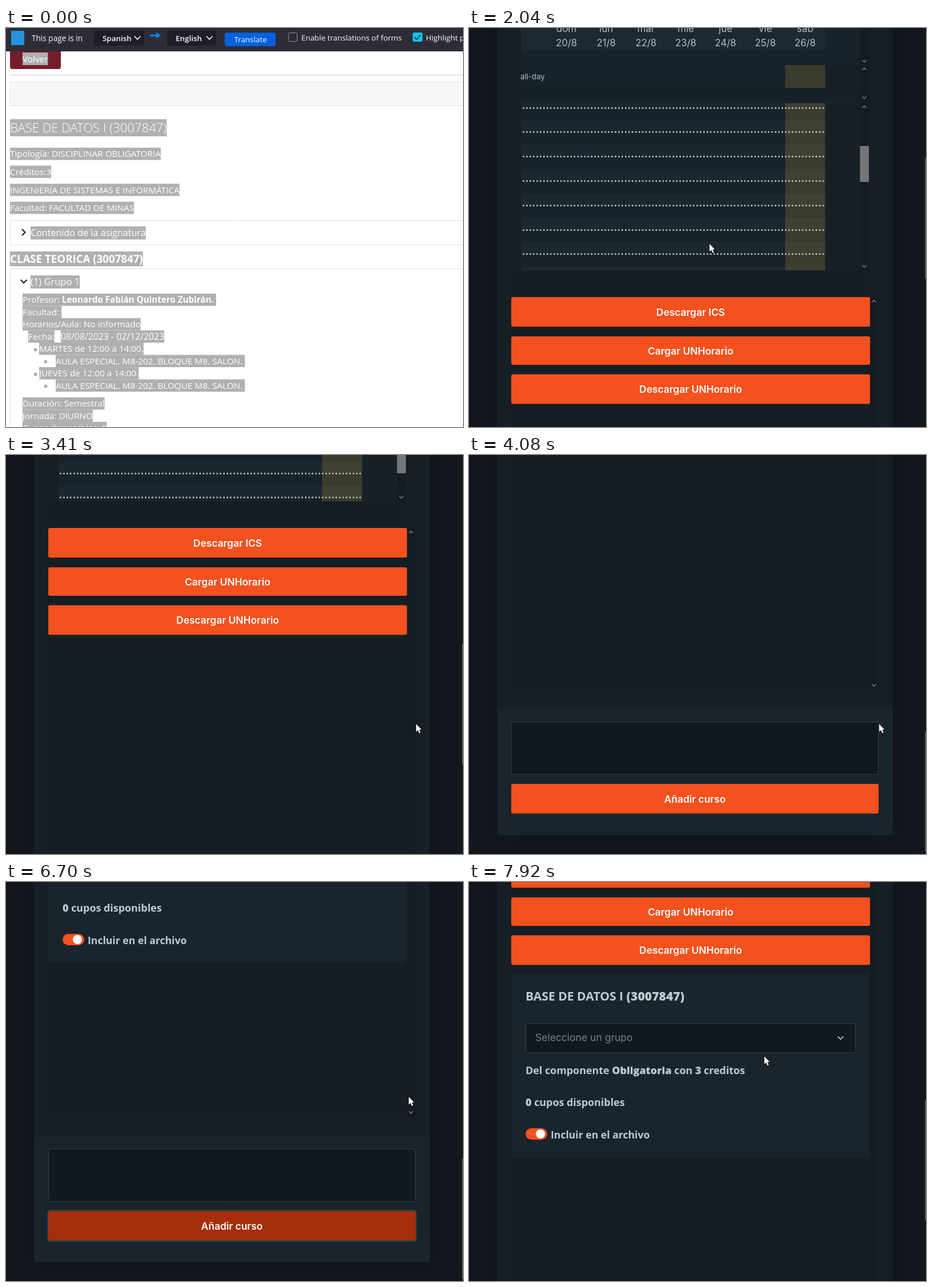
These frames come from a looping animation (800 by 700 pixels, 7.99 s). An HTML page with a canvas:

```html
<!DOCTYPE html>
<html lang="es">
<head>
<meta charset="utf-8">
<style>
  html, body { margin: 0; width: 100%; height: 100%; overflow: hidden; background: #11181f; }
  canvas { display: block; }
</style>
</head>
<body>
<canvas id="stage" width="800" height="700"></canvas>
<script>
const LOOP = 7990;
const c = document.getElementById('stage').getContext('2d');
const SANS = '"Open Sans", "Noto Sans", sans-serif';
const UI = 'Inter, sans-serif';
const ORANGE = [244, 81, 30], HOVER = [189, 57, 16], PRESSED = [165, 46, 13];

// Eased value from [time, value] keys.
function at(t, keys) {
  if (t <= keys[0][0]) return keys[0][1];
  for (let i = 1; i < keys.length; i++) {
    const [t0, a] = keys[i - 1], [t1, b] = keys[i];
    if (t < t1) {
      const p = (t - t0) / (t1 - t0);
      return a + (b - a) * p * p * (3 - 2 * p);
    }
  }
  return keys[keys.length - 1][1];
}
const mix = (a, b, p) => `rgb(${a.map((v, i) => Math.round(v + (b[i] - v) * p))})`;

function rect(x, y, w, h, fill, radius = 0, stroke) {
  c.beginPath();
  c.roundRect(x, y, w, h, radius);
  if (fill) { c.fillStyle = fill; c.fill(); }
  if (stroke) { c.strokeStyle = stroke; c.lineWidth = 1; c.stroke(); }
}
function text(s, x, y, size, color, { weight = 400, family = SANS, align = 'left' } = {}) {
  c.font = `${weight} ${size}px ${family}`;
  c.textAlign = align;
  c.fillStyle = color;
  c.fillText(s, x, y);
  return c.measureText(s).width;
}
function selected(s, x, top, h, size = 15.3, weight = 400) {
  c.font = `${weight} ${size}px ${SANS}`;
  const w = c.measureText(s).width;
  rect(x, top, w, h, '#b0b0b0');
  text(s, x, top + h * 0.76, size, '#fff', { weight });
  return x + w;
}
function line(points, color, width) {
  c.beginPath();
  points.forEach(([x, y]) => c.lineTo(x, y));
  c.strokeStyle = color;
  c.lineWidth = width;
  c.stroke();
}
// dir 1 points down, -1 points up
const chevron = (x, y, dir, size = 3.5, color = '#747a80', width = 1.6) =>
  line([[x - size, y - dir * size / 2], [x, y + dir * size / 2], [x + size, y - dir * size / 2]], color, width);

function drawToolbar() {
  rect(0, 0, 800, 41, '#2e2d37');
  rect(9, 5, 23, 25, '#2493e0');
  text('This page is in', 45, 23, 13.6, '#fbfbfe');
  [['Spanish', 154, 88], ['English', 282, 86]].forEach(([s, x, w]) => {
    rect(x, 4, w, 27, '#1f1e27', 4);
    text(s, x + 15, 23, 13.4, '#fbfbfe', { weight: 600 });
    chevron(x + w - 12, 17, 1, 5.5, '#fbfbfe', 1.6);
  });
  line([[252, 13], [266, 13]], '#0a84e8', 3);
  c.beginPath();
  c.moveTo(263, 7.5); c.lineTo(271, 13); c.lineTo(263, 18.5);
  c.fillStyle = '#0a84e8';
  c.fill();
  rect(383, 8, 89, 24, '#0061e0', 4);
  text('Translate', 428, 25, 13.4, '#fbfbfe', { align: 'center' });
  rect(494.5, 8.5, 15, 15, '#2b2a33', 2, '#8f8f9d');
  text('Enable translations of forms', 517, 22, 13.4, '#fbfbfe');
  rect(712, 8, 17, 16, '#00c8f2', 2);
  line([[715, 16], [719, 20], [726, 12]], '#2b2a33', 1.8);
  text('Highlight phrases', 735, 22, 13.4, '#fbfbfe');
}

function drawCatalog() {
  rect(0, 0, 800, 700, '#fff');
  rect(7, 30, 89, 42, '#761d2c', 4);
  selected('Volver', 29, 43, 22);
  rect(7, 82, 793, 1, '#c9cad0');
  rect(7.5, 94.5, 800, 42, '#f7f8fa', 0, '#dfe3e8');
  rect(0, 94, 7, 44, '#fff');
  selected('BASE DE DATOS I (3007847)', 7, 160, 30, 22.1, 300);
  ['Tipología: DISCIPLINAR OBLIGATORIA', 'Créditos:3',
   'INGENIERÍA DE SISTEMAS E INFORMÁTICA', 'Facultad: FACULTAD DE MINAS']
    .forEach((s, i) => selected(s, 7, 210 + i * 31.6, 21.5));
  rect(7.5, 337.5, 800, 43, '#fff', 0, '#dfe1e5');
  line([[28, 353], [33.5, 358.5], [28, 364]], '#222', 2.2);
  selected('Contenido de la asignatura', 43, 348, 23, 16.1);
  selected('CLASE TEORICA (3007847)', 7, 392, 26, 18.7, 700);
  rect(7.5, 422.5, 800, 400, '#fff', 0, '#dfe1e5');
  chevron(31, 444.5, 1, 5.5, '#222', 2.2);
  selected('(1) Grupo 1', 43, 434, 23, 16.5);
  const end = selected('Profesor: ', 29, 466, 21.5);
  selected('Leonardo Fabián Quintero Zubirán. ', end, 466, 21.5, 15.2, 700);
  selected('Facultad: ', 29, 487.5, 21.5);
  selected('Horarios/Aula: No informado', 29, 509, 21.5);
  selected('Fecha:', 39, 530.5, 21.5);
  selected('08/08/2023 - 02/12/2023', 96, 530.5, 21.5, 15.8);
  ['MARTES', 'JUEVES'].forEach((day, i) => {
    const y = 552 + i * 43;
    rect(49, y + 10, 5, 5, '#a8a8a8');
    selected(day + ' de 12:00 a 14:00.', 58, y, 21.5);
    rect(67, y + 31, 5, 5, '#a8a8a8');
    selected('AULA ESPECIAL. M8-202. BLOQUE M8. SALON. ', 87, y + 21.5, 21.5);
  });
  ['Duración: Semestral', 'Jornada: DIURNO', 'Cupos disponibles: 0']
    .forEach((s, i) => selected(s, 29, 648 + i * 21.5, 21.5));
  drawToolbar();
}

function drawCalendar(t) {
  const ROW = 42.8, END = 491.6;
  const scroll = at(t, [[2060, 0], [2240, END / 2], [2300, END / 2], [2480, END]]);
  rect(91, 0, 609, 425, '#18222a');
  rect(91, 0, 532.5, 40, '#1e2830');
  rect(91, 105, 609, 27, '#162027');
  rect(623.5, 65, 61.5, 360, '#172027');
  rect(685, 0, 15, 425, '#141b22');
  rect(91, 129, 609, 2, '#1a242b');
  ['dom', 'lun', 'mar', 'mié', 'jue', 'vie', 'sáb'].forEach((day, i) => {
    const x = 170.5 + i * 69.65, style = { family: UI, align: 'center' };
    text(day, x, 7, 17, '#b3bfc7', style);
    text(20 + i + '/8', x, 31.5, 16.7, '#b3bfc7', style);
  });
  text('all-day', 90, 90, 13.2, '#b3bfc7', { family: UI });
  rect(553.5, 65, 70, 40, '#3b3c2c');

  c.save();
  c.beginPath();
  c.rect(91, 132, 532.5, 293);
  c.clip();
  rect(553.5, 132, 70, 293, '#3b3c2c');
  c.lineCap = 'round';
  for (let rowY = 140 - scroll % ROW; rowY < 460; rowY += ROW) {
    const y = Math.floor(rowY) + 0.5;
    rect(91, y - 21, 533, 21, 'rgba(255,255,255,.025)');
    c.setLineDash([0, 5.96]);
    line([[95.5, y], [621, y]], '#bcc7cd', 3);
    c.setLineDash([]);
  }
  c.restore();

  rect(684.5, 207 + 106 * scroll / END, 15.5, 63, '#74777a');
  [[58, 1], [72, -1], [122, 1], [138.5, -1], [418, 1]].forEach(([y, dir]) => chevron(692, y, dir));
}

function button(label, x, y, w, h, color) {
  rect(x, y, w, h, color, 3);
  text(label, x + w / 2, y + h / 2 + 6.5, 17.4, '#fff', { weight: 600, family: UI, align: 'center' });
}

function runs(x, y, size, parts) {
  parts.forEach(([s, weight]) => { x += text(s, x, y, size, '#bfcad2', { weight }); });
}

function drawCourse() {
  rect(74, 676, 628, 321, '#1a242c', 3);
  runs(99, 722, 21.1, [['BASE DE DATOS I ', 700], ['(3007847)', 800]]);
  rect(99.5, 762.5, 577, 51, '#11181e', 3, '#33434f');
  text('Seleccione un grupo', 116, 793, 17.5, '#73828c', { family: UI });
  chevron(650.5, 787.5, 1, 5, '#a5b1b9', 1.8);
  runs(99, 851, 17.9, [['Del componente ', 700], ['Obligatoria', 800], [' con ', 700], ['3', 800], [' creditos', 700]]);
  runs(99, 907, 17.9, [['0', 800], [' cupos disponibles', 700]]);
  rect(99, 946, 38, 20, '#f4511e', 10);
  rect(117, 948, 16, 16, '#fff', 8);
  runs(143, 964, 17.6, [['Incluir en el archivo', 700]]);
}

function squiggle(x, y, w) {
  const points = [];
  for (let i = 0; i <= w; i += 2) points.push([x + i, y + (i / 2 % 2) * 2]);
  line(points, '#d23c3c', 1);
}

function drawForm(t) {
  const focused = t >= 4620 && t < 5740;
  const pressed = at(t, [[5740, 0], [5900, 1]]);
  rect(49, 1301, 693, 221, '#1a242c', [0, 0, 4, 4]);
  if (focused) rect(72.5, 1321.5, 646, 95, '#27424e', 5);
  rect(74.5, 1323.5, 642, 92, '#11181e', 3, focused ? '#d9481d' : '#2f3e4a');
  if (t >= 4830 && t < 5880) {
    c.save();
    c.beginPath();
    c.rect(75, 1324, 641, 91);
    c.clip();
    const put = (s, x, y) => text(s, x, y, 17, '#a9b5bd', { family: UI });
    put('Académica', 92, 1332);
    let x = 92 + put('Espacio de Gestiones Escolares (', 92, 1358);
    let w = put('V.', x, 1358);
    squiggle(x, 1360, w);
    x += w;
    x += put(' 4.3.20) |', x, 1358);
    w = put('ZKVE', x, 1358);
    squiggle(x, 1360, w);
    put(' Todos los derechos', x + w, 1358);
    put('reservados', 92, 1382.5);
    rect(701, 1383, 15, 16, '#74777a');
    c.restore();
    chevron(709, 1331, -1);
    chevron(709, 1407, 1);
  }
  if (pressed) rect(72, 1430, 647, 56, `rgba(34,68,80,${pressed})`, 5);
  const hover = at(t, [[5300, 0], [5430, 1]]);
  const color = pressed ? mix(HOVER, PRESSED, pressed) : mix(ORANGE, HOVER, hover);
  button('Añadir curso', 74, 1432, 643, 52, color);
}

function drawPlanner(t, scroll) {
  rect(0, 0, 800, 700, '#13181f');
  c.save();
  c.translate(0, -scroll);
  c.shadowColor = 'rgba(8,16,20,.6)';
  c.shadowBlur = 40;
  rect(49, -60, 693, 1582, '#171f26', 4);
  c.shadowColor = 'transparent';
  rect(74, 425, 628, 842, '#151e25');
  rect(702, 472, 15, 795, '#151b22');
  drawCalendar(t);
  const icsHover = at(t, [[1430, 0], [1510, 1], [1560, 1], [1680, 0]]);
  button('Descargar ICS', 74, 472, 628, 52, mix(ORANGE, HOVER, icsHover));
  button('Cargar UNHorario', 74, 541, 628, 50, '#f4511e');
  button('Descargar UNHorario', 74, 607.5, 628, 52, '#f4511e');
  chevron(709, 479.5, -1);
  chevron(709, 1259, 1);
  if (t >= 5880) drawCourse();
  drawForm(t);
  c.restore();
  rect(798.7, 228 + scroll * 0.3, 1.3, 212, '#777c81');
}

function drawPointer(x, y, kind) {
  c.save();
  c.translate(x, y);
  if (kind === 'beam') {
    line([[-3, -9], [3, -9]], '#ddd', 1);
    line([[0, -9], [0, 9]], '#ddd', 1);
    line([[-3, 9], [3, 9]], '#ddd', 1);
  } else {
    const shape = kind === 'hand'
      ? 'M-1.5 1Q0-1 1.5 1V6L7 7.5Q8.5 8 8 11L6.5 15V18H-1.5V15.5L-5 10.5Q-5.5 8-3 9L-1.5 11Z'
      : 'M0 0V13.5L3.2 10.7L5.5 16L7.7 15L5.4 9.8H9.4Z';
    const path = new Path2D(shape);
    c.lineWidth = 1.6;
    c.strokeStyle = '#111';
    c.stroke(path);
    c.fillStyle = '#fff';
    c.fill(path);
  }
  c.restore();
}

const pointerPath = [
  [170, 605, 405], [260, 503, 13], [1340, 490, 172], [1510, 432, 486], [1560, 430, 486], [1700, 413, 445],
  [1980, 413, 445], [2080, 425, 345], [2480, 425, 345], [2720, 718, 472], [4080, 718, 472], [4420, 560, 511],
  [5200, 560, 511], [5430, 530, 602], [6330, 530, 602], [6700, 705, 377], [7480, 705, 377], [7760, 517, 306]
];
const pointerX = pointerPath.map(([t, x]) => [t, x]);
const pointerY = pointerPath.map(([t, , y]) => [t, y]);
const pageScroll = [
  [2960, 0], [3170, 172], [3200, 172], [3410, 344], [3530, 344], [3750, 688], [3790, 688], [4020, 855],
  [6950, 855], [7310, 684], [7490, 684], [7900, 514]
];

function draw(t) {
  if (t < 1160) drawCatalog();
  const scroll = at(t, pageScroll);
  if (t >= 1160) drawPlanner(t, scroll);
  if (t < 170 || (t >= 300 && t < 1350)) return;
  const x = at(t, pointerX), y = at(t, pointerY), pageY = y + scroll;
  const within = (top, bottom) => t >= 1160 && x > 74 && x < 702 && pageY > top && pageY < bottom;
  const kind = within(472, 524) || within(1432, 1484) ? 'hand' : within(1323, 1415) ? 'beam' : 'arrow';
  drawPointer(x, y, kind);
}

function frame(now) {
  draw(now % LOOP);
  requestAnimationFrame(frame);
}
requestAnimationFrame(frame);
</script>
</body>
</html>
```
